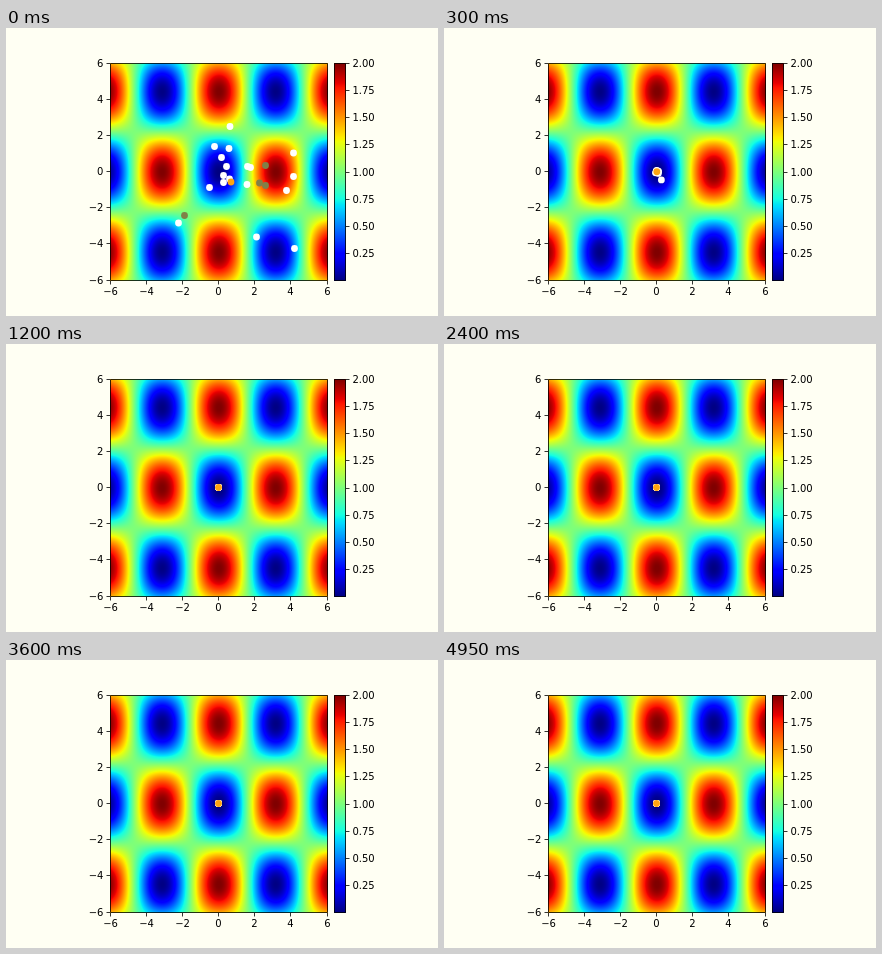
These frames come from a looping animation (432x288 px, 5000 ms). An HTML page with a canvas:

```html
<!DOCTYPE html>
<html>
<head>
<meta charset="utf-8">
<style>
  html, body { margin: 0; width: 100%; height: 100%; overflow: hidden; background: #fffff3; }
  canvas, svg { position: absolute; left: 0; top: 0; width: 432px; height: 288px; }
  text { font: 10px "DejaVu Sans", sans-serif; }
  path { stroke: #000; stroke-width: .8; fill: none; }
</style>
</head>
<body>
<canvas id="field" width="432" height="288"></canvas>
<svg id="chart" viewBox="0 0 432 288"></svg>
<script>
const LEFT = 104, TOP = 35, SIZE = 217, BAR_X = 328, BAR_W = 12;
const UNIT = SIZE / 12, CX = LEFT + SIZE / 2, CY = TOP + SIZE / 2;
const RIGHT = LEFT + SIZE, BOTTOM = TOP + SIZE;
const STEP_MS = 50, LOOP_MS = 5000;
const chart = document.getElementById('chart');

// Jet colour map as [position, intensity] stops per channel.
const JET = [
  [[0, 0], [.35, 0], [.66, 1], [.89, 1], [1, .5]],
  [[0, 0], [.125, 0], [.375, 1], [.64, 1], [.91, 0], [1, 0]],
  [[0, .5], [.11, 1], [.34, 1], [.65, 0], [1, 0]]
];

function channel(stops, v) {
  const i = Math.max(1, stops.findIndex(s => s[0] >= v));
  const [a, p] = stops[i - 1], [b, q] = stops[i];
  return 255 * (p + (q - p) * (v - a) / (b - a));
}

const jet = v => JET.map(stops => channel(stops, Math.min(1, Math.max(0, v))));

const griewank = (x, y) =>
  1 + (x * x + y * y) / 4000 - Math.cos(x) * Math.cos(y / Math.SQRT2);

function paint(ctx, x0, width, valueAt) {
  const img = ctx.createImageData(width, SIZE + 1);
  for (let y = 0, i = 0; y <= SIZE; y++)
    for (let x = 0; x < width; x++, i += 4)
      img.data.set([...jet(valueAt(x, y) / 2), 255], i);
  ctx.putImageData(img, x0, TOP);
}

function add(tag, attrs, text = '') {
  const el = document.createElementNS('http://www.w3.org/2000/svg', tag);
  for (const name in attrs) el.setAttribute(name, attrs[name]);
  el.textContent = text;
  return chart.appendChild(el);
}

const label = (x, y, anchor, text) => add('text', { x, y, 'text-anchor': anchor }, text);
const frame = (x, w) => add('path', { d: `M${x + .5} ${TOP + .5}h${w}v${SIZE}h${-w}z` });

const ctx = document.getElementById('field').getContext('2d');
paint(ctx, LEFT, SIZE + 1, (x, y) => griewank((x - SIZE / 2) / UNIT, (y - SIZE / 2) / UNIT));
paint(ctx, BAR_X, BAR_W, (x, y) => 2 * (1 - y / SIZE));

// Start positions; the optional third number is the shrink factor per step.
const swarm = [
  ['#808048', [[259.5, 137.5], [253.5, 155], [259.5, 157.5], [178.5, 187.5]]],
  ['#fff', [
    [224, 98.5], [208.5, 118.5], [223, 120.5], [215.5, 129.5], [220.5, 138.5],
    [241.5, 138.5], [244.5, 139.5], [217.5, 147.5], [217.5, 154.5], [223.5, 151],
    [203.5, 159.5], [241, 156.5], [287.5, 125], [287.5, 148.5], [280.5, 162.5],
    [172.5, 195], [250.5, 209, .71], [288.5, 220.5]
  ]],
  ['#ffa510', [[225, 154]]]
];
const dots = swarm.flatMap(([fill, starts]) => starts.map(([x, y, shrink = .54]) =>
  ({ dx: x - CX, dy: y - CY, shrink, el: add('circle', { r: 3.4, fill }) })));

frame(LEFT, SIZE);
frame(BAR_X, BAR_W - 1);
for (let n = -6; n <= 6; n += 2) {
  const x = Math.round(CX + n * UNIT - .5) + .5;
  const y = Math.round(CY - n * UNIT - .5) + .5;
  const text = String(n).replace('-', '\u2212');
  add('path', { d: `M${x} ${BOTTOM + 1}v3.5M${LEFT} ${y}h-3.5` });
  label(x, BOTTOM + 15, 'middle', text);
  label(LEFT - 6.6, y + 3.5, 'end', text);
}
for (let v = .25; v <= 2; v += .25) {
  const y = Math.round(BOTTOM - v / 2 * SIZE) + .5;
  add('path', { d: `M${BAR_X + BAR_W} ${y}h3.5` });
  label(346.4, y + 3.5, 'start', v.toFixed(2));
}

function draw(now) {
  const step = Math.floor(now % LOOP_MS / STEP_MS);
  for (const { dx, dy, shrink, el } of dots) {
    const k = shrink ** step;
    el.setAttribute('cx', CX + dx * k);
    el.setAttribute('cy', CY + dy * k);
  }
}

const start = performance.now();
function tick() {
  draw(performance.now() - start);
  requestAnimationFrame(tick);
}
tick();
</script>
</body>
</html>
```
